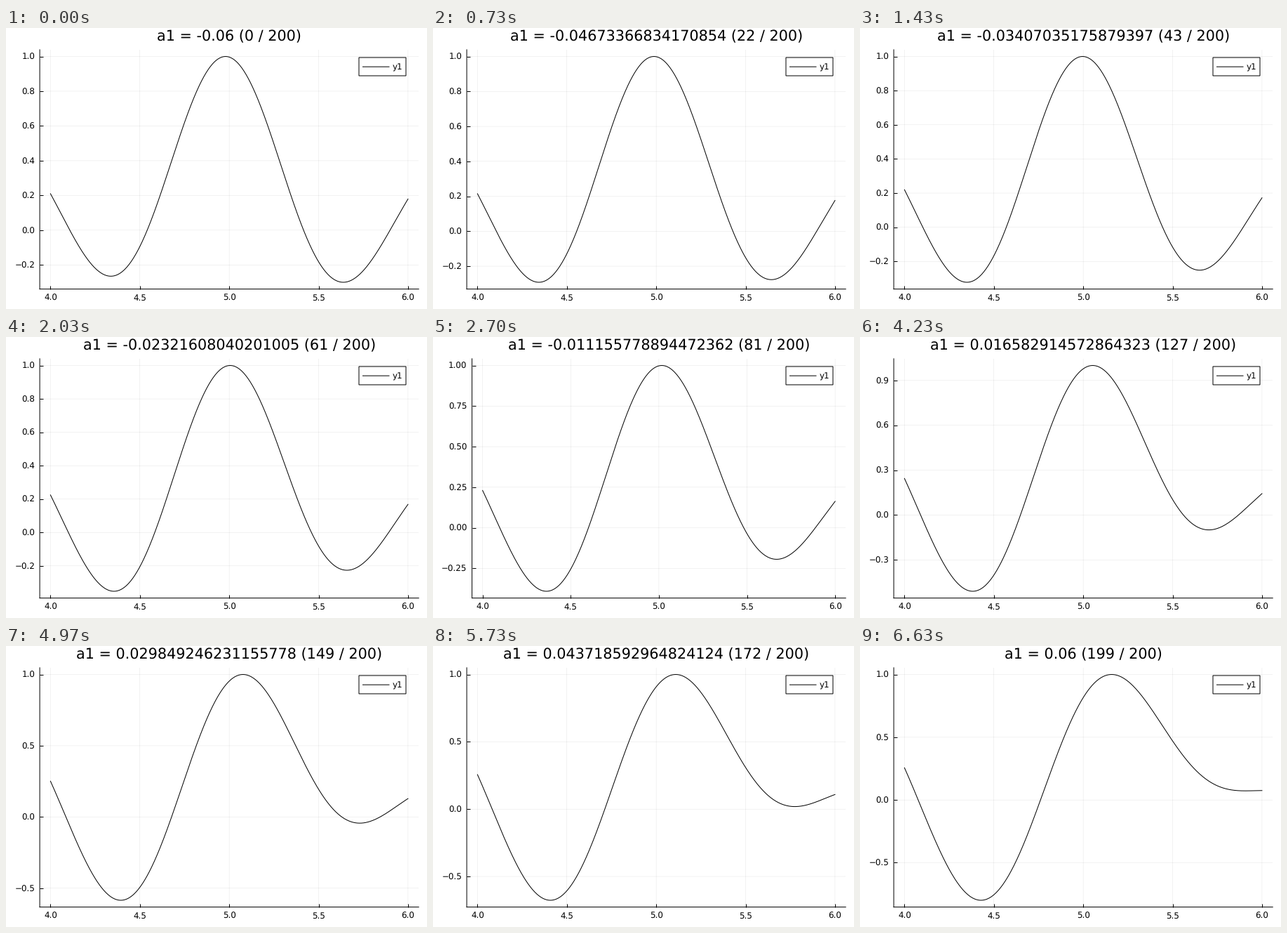
These frames come from a looping animation (600 by 400 pixels, 6.66 s). A matplotlib script:

```python
import matplotlib.pyplot as plt
import numpy as np
from matplotlib.animation import FuncAnimation
from matplotlib.lines import Line2D
from matplotlib.patches import Rectangle

W, H, DPI = 600, 400, 100
PX = 72 / DPI                       # one pixel in points
LOOP, TICK, STEPS = 6660, 20, 200   # ms, ms, values of a1
LABEL, TITLE = 8.54, 14.94
BOTTOM, HEIGHT, RIGHT = 371.6, 340.7, 588.2
NICE = {0.2: 0.7, 0.25: 0.5, 0.3: 0.2, 0.5: 0.9}

plt.rcParams.update({"font.family": "DejaVu Sans", "text.hinting": "none",
                     "path.snap": False})


def waves(x, slope=False, base=1.75, order=4):
    """Constant, cosines and sines around x = 5, or their slopes."""
    t = np.atleast_1d(x)[:, None] - 5
    f = base * np.arange(1, order + 1)
    c, s = np.cos(f * t), np.sin(f * t)
    if slope:
        return np.hstack([0 * t, -f * s, f * c])
    return np.hstack([1 + 0 * t, c, s])


def fit(turns, points):
    """Smooth wave through all points, level at the turning points."""
    turns, points = np.array(turns), np.array(points)
    pts = np.vstack([turns, points])
    level = 0.1 * waves(turns[:, 0], slope=True)
    n = level.shape[1]
    A = np.vstack([waves(pts[:, 0]), level, 0.005 * np.eye(n)])
    b = np.concatenate([pts[:, 1], np.zeros(len(turns) + n)])
    return waves(xs) @ np.linalg.lstsq(A, b, rcond=None)[0]


# The curve is linear in a1 before it is scaled to a peak of 1,
# so the two end shapes give all others.
xs = np.linspace(4, 6, 500)
first = 2.35 * fit([(4.34, -.267), (4.982, 1), (5.639, -.2986)],
                   [(4, .21), (4.108, 0), (4.54, 0), (5.415, 0), (5.9, 0), (6, .18)])
last = fit([(4.432, -.8006), (5.164, 1), (5.914, .0728)],
           [(4, .258), (4.076, 0), (4.76, 0), (5.485, .5), (6, .0756)])


def curve(u):
    y = (1 - u) * first + u * last
    return y / y.max()


def ticks_for(low, high, step):
    return step * np.arange(np.ceil(low / step), np.floor(high / step) + 1)


def best_step(low, high):
    """Weigh tick count, coverage and roundness of each step."""
    def score(step):
        n = len(ticks_for(low, high, step))
        if not 4 <= n <= 8:
            return -1
        count = 1 - abs(n - 5) / 5
        cover = (high - low) / (step * (n - 1))
        return count / 4 + cover / 2 + NICE[step] / 4
    return max(NICE, key=score)


def px(x, y):
    return x / W, 1 - y / H


fig = plt.figure(figsize=(W / DPI, H / DPI), dpi=DPI, facecolor="white")
ax = fig.add_axes([0.08, 0.07, 0.9, 0.85])
ax.set_axisbelow(True)
ax.spines[["top", "right"]].set_visible(False)
ax.spines[["left", "bottom"]].set_linewidth(PX)
ax.tick_params(direction="in", length=5 * PX, width=PX, labelsize=LABEL)
ax.tick_params(axis="x", pad=7.2 * PX)
ax.tick_params(axis="y", pad=7 * PX)
ax.grid(color="black", alpha=0.1, linewidth=PX / 2)
ax.set_xlim(3.94, 6.06)
x_ticks = np.arange(4, 6.1, 0.5)
ax.set_xticks(x_ticks, [f"{v:.1f}" for v in x_ticks])
line, = ax.plot([], [], color="black", lw=PX)
title = fig.text(*px(318, 18.5), "", fontsize=TITLE, ha="center", va="baseline")

# Legend
fig.add_artist(Rectangle(px(503, 68), 67 / W, 26 / H, fc="white", ec="black",
                         lw=PX, transform=fig.transFigure, zorder=2))
fig.add_artist(Line2D([508.5 / W, 546 / W], [1 - 55.2 / H] * 2,
                      color="black", lw=PX, zorder=3))
fig.text(*px(550.7, 59.6), "y1", fontsize=LABEL, va="baseline", zorder=3)


def draw(k):
    i = min(round((k + 0.5) * TICK * STEPS / LOOP), STEPS - 1)
    y = curve(i / (STEPS - 1))
    pad = 0.03 * (1 - y.min())
    low, high = y.min() - pad, 1 + pad
    step = best_step(low, high)
    digits = len(str(step)) - 2
    left = 48.1 + 7.5 * (digits - 1)
    ticks = ticks_for(low, high, step)

    ax.set_position([left / W, 1 - BOTTOM / H, (RIGHT - left) / W, HEIGHT / H])
    ax.set_ylim(low, high)
    ax.set_yticks(ticks, [f"{v:.{digits}f}".replace("-", "\u2212") for v in ticks])
    line.set_data(xs, y)

    a1 = (12 * i - 1194) / 19900
    title.set_text(f"a1 = {a1} ({i} / {STEPS})")
    title.set_x((left + RIGHT) / 2 / W)
    return line, title


anim = FuncAnimation(fig, draw, frames=LOOP // TICK, interval=TICK,
                     repeat=True, repeat_delay=0, blit=False)
plt.show()
```
